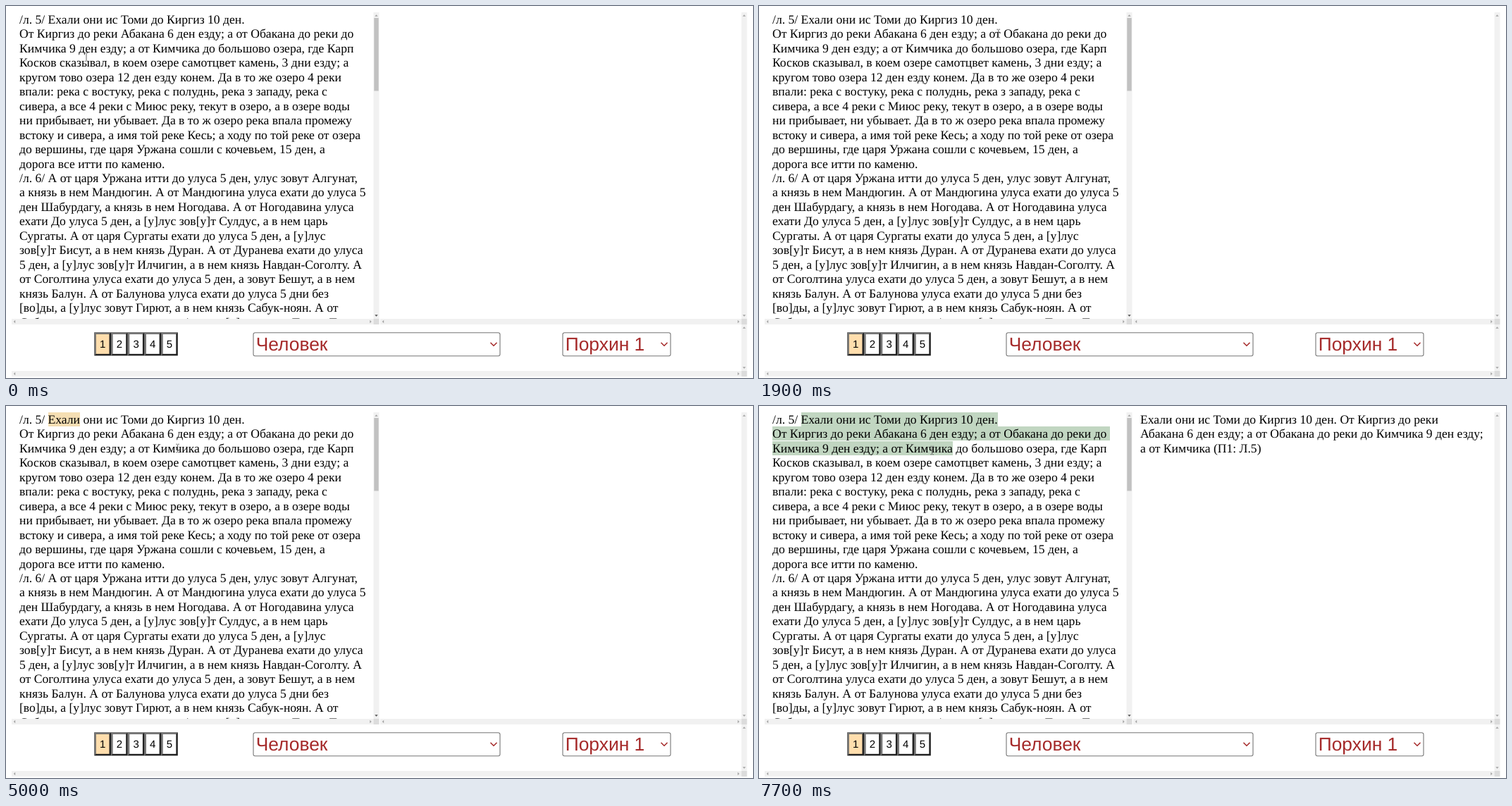
An HTML page that plays this animation: 1060 px wide and 528 px high, repeating every 8 s.

```html
<!DOCTYPE html>
<html lang="ru">
<head>
<meta charset="utf-8">
<title>Разметка текста</title>
<style>
html, body { margin: 0; width: 100%; height: 100%; overflow: hidden; background: #fff; }
.pane {
  position: absolute; top: 9px; height: 435px; overflow: hidden; white-space: pre;
  font: 17.6px/20.46px "Liberation Serif", serif; color: #000;
  text-rendering: geometricPrecision;
}
#text { left: 19px; width: 502px; }
#quote { left: 541px; width: 502px; }
svg { position: absolute; left: 0; top: 0; text-rendering: geometricPrecision; }
svg text { font-family: "Liberation Sans", sans-serif; }
</style>
</head>
<body>
<div class="pane" id="text">/л. 5/ <span id="marked"></span><span id="plain"></span> до большово озера, где Карп
Косков сказывал, в коем озере самотцвет камень, 3 дни езду; а
кругом тово озера 12 ден езду конем. Да в то же озеро 4 реки
впали: река с востуку, река с полуднь, река з западу, река с
сивера, а все 4 реки с Миюс реку, текут в озеро, а в озере воды
ни прибывает, ни убывает. Да в то ж озеро река впала промежу
встоку и сивера, а имя той реке Кесь; а ходу по той реке от озера
до вершины, где царя Уржана сошли с кочевьем, 15 ден, а
дорога все итти по каменю.
/л. 6/ А от царя Уржана итти до улуса 5 ден, улус зовут Алгунат,
а князь в нем Мандюгин. А от Мандюгина улуса ехати до улуса 5
ден Шабурдагу, а князь в нем Ногодава. А от Ногодавина улуса
ехати До улуса 5 ден, а [у]лус зов[у]т Сулдус, а в нем царь
Сургаты. А от царя Сургаты ехати до улуса 5 ден, а [у]лус
зов[у]т Бисут, а в нем князь Дуран. А от Дуранева ехати до улуса
5 ден, а [у]лус зов[у]т Илчигин, а в нем князь Навдан-Соголту. А
от Соголтина улуса ехати до улуса 5 ден, а зовут Бешут, а в нем
князь Балун. А от Балунова улуса ехати до улуса 5 дни без
[во]ды, а [у]лус зовут Гирют, а в нем князь Сабук-ноян. А от
Сабукова улуса ехати до улуса 4 ден, а [у]лус зовут Тумен-Тумет</div>
<div class="pane" id="quote">Ехали они ис Томи до Киргиз 10 ден. От Киргиз до реки
Абакана 6 ден езду; а от Обакана до реки до Кимчика 9 ден езду;
а от Кимчика (П1: Л.5)</div>
<svg id="ui" width="1060" height="528" viewBox="0 0 1060 528"></svg>
<script>
const LOOP = 8000, STEP = 100;
const byId = id => document.getElementById(id);

const passage = 'Ехали они ис Томи до Киргиз 10 ден.\n' +
  'От Киргиз до реки Абакана 6 ден езду; а от Обакана до реки до \n' +
  'Кимчика 9 ден езду; а от Кимчика';
const upTo = word => passage.indexOf(word) + word.length;

// Interface drawing
const rect = (x, y, w, h, fill, extra = '') =>
  `<rect x="${x}" y="${y}" width="${w}" height="${h}" fill="${fill}" ${extra}/>`;

const arrow = (x, y, angle, fill = '#a3a3a3') =>
  `<path d="M-2.2 1.2L0 -1.2L2.2 1.2z" fill="${fill}" transform="translate(${x} ${y}) rotate(${angle})"/>`;

function scrollbar(x, y, w, h, endFill) {
  const track = rect(x, y, w, h, '#f1f1f1');
  return h > w
    ? track + arrow(x + w / 2, y + 4.5, 0) + arrow(x + w / 2, y + h - 4.5, 180, endFill)
    : track + arrow(x + 4, y + h / 2, -90) + arrow(x + w - 4, y + h / 2, 90);
}

function button(n) {
  const w = 23.7, h = 33, b = 2.5, x = 125.3 + (n - 1) * w, y = 463.3;
  return rect(x, y, w, h, '#212121') +
    `<path d="M${x} ${y}h${w}l${-b} ${b}H${x + b}V${y + h - b}l${-b} ${b}z" fill="#767676"/>` +
    rect(x + b, y + b, w - 2 * b, h - 2 * b, n === 1 ? 'navajowhite' : '#fff') +
    `<text x="${x + w / 2}" y="484.6" font-size="15" text-anchor="middle">${n}</text>`;
}

function dropdown(x, w, label) {
  return rect(x + .5, 463.8, w - 1, 33, '#fff', 'rx="2.5" stroke="#767676" stroke-width="1.1"') +
    `<text x="${x + 4.2}" y="489.3" font-size="26.4" fill="brown">${label}</text>` +
    `<path d="M${x + w - 14} 477.7l4.5 4.6l4.5 -4.6" fill="none" stroke="brown" stroke-width="1.5"/>`;
}

const corner = (x, y) => rect(x, y, 8, 8, '#dcdcdc');

byId('ui').innerHTML =
  scrollbar(521.5, 9, 8, 435, '#505050') + rect(522.3, 17, 6.4, 103.5, '#c1c1c1') +
  scrollbar(8, 444, 513.5, 8) + corner(521.5, 444) +
  scrollbar(1043.5, 9, 8, 435) + scrollbar(531, 444, 512.5, 8) + corner(1043.5, 444) +
  scrollbar(1043.5, 452, 8, 66) + scrollbar(8, 518, 1035.5, 8) + corner(1043.5, 518) +
  [1, 2, 3, 4, 5].map(button).join('') +
  dropdown(350.5, 351, 'Человек') + dropdown(789.5, 154, 'Порхин 1') +
  '<path id="cursor" d="M-2.3 -5.8h1.8M.5 -5.8h1.8M0 -5.3V5.3M-2.3 5.8h1.8M.5 5.8h1.8" stroke="#666"/>';

// Pointer moves: first step, last step, destination
const moves = [
  [0, 0, 114, 72.5],
  [300, 700, 78.5, 20],
  [900, 900, 78, 19.5],
  [1200, 1300, 270, 19],
  [1400, 1500, 333, 26],
  [1600, 1700, 339.8, 39],
  [2100, 2400, 95.5, 31.5],
  [3200, 3200, 79.5, 17.5],
  [3700, 4100, 216.5, 75],
  [4200, 4500, 242.5, 62],
  [4700, 4700, 242.7, 61],
  [5000, 5000, 243.6, 60],
  [5600, 5800, 245.3, 62],
  [6500, 6500, 245.6, 63]
];

function pointerAt(t) {
  let x = 0, y = 0;
  for (const [start, end, toX, toY] of moves) {
    if (t < start) break;
    const part = Math.min(1, (t - start + STEP) / (end - start + STEP));
    x += (toX - x) * part;
    y += (toY - y) * part;
  }
  return [x, y];
}

// Highlight states: time, marked length, background, text colour
const BLUE = '#3390ff', WHEAT = '#f5deb3', GREEN = '#c1d6c1';
const highlights = [
  [0, 0, '', ''],
  [1100, upTo('Ехали'), BLUE, '#fff'],
  [1200, upTo('Томи'), BLUE, '#fff'],
  [1300, upTo('Киргиз'), BLUE, '#fff'],
  [1400, upTo('10 ден.'), BLUE, '#fff'],
  [1900, 0, '', ''],
  [3400, upTo('Ехали'), WHEAT, ''],
  [5200, passage.length, WHEAT, ''],
  [7700, passage.length, GREEN, '']
];

let shown;
function draw(now) {
  const t = Math.floor(now % LOOP / STEP) * STEP;
  const state = highlights.findLast(([start]) => start <= t);
  if (state !== shown) {
    shown = state;
    const [, length, background, color] = state;
    const marked = byId('marked');
    marked.textContent = passage.slice(0, length);
    byId('plain').textContent = passage.slice(length);
    marked.style.background = background;
    marked.style.color = color;
    byId('quote').style.visibility = background === GREEN ? 'visible' : 'hidden';
  }
  byId('cursor').setAttribute('transform', `translate(${pointerAt(t)})`);
}

const began = performance.now();
function tick() {
  draw(performance.now() - began);
  requestAnimationFrame(tick);
}
tick();
</script>
</body>
</html>
```
